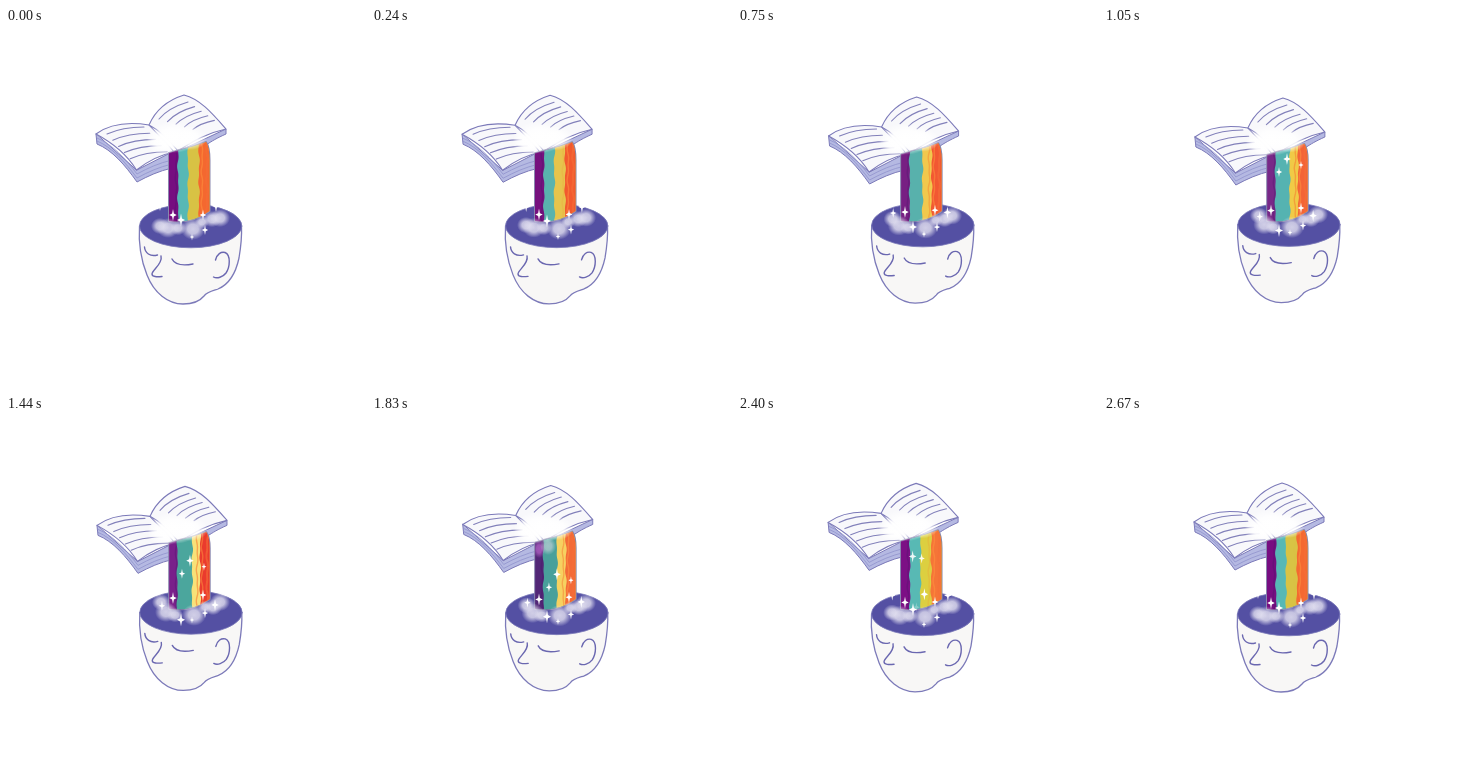
An HTML page with a canvas for the animation above (2700 ms loop, 360 px wide and 360 px high).

```html
<!DOCTYPE html>
<html lang="en">
<head>
<meta charset="utf-8">
<title>Reading mind</title>
<style>
html, body { margin: 0; width: 100%; height: 100%; overflow: hidden; background: #fff; }
canvas { display: block; width: 360px; height: 360px; }
</style>
</head>
<body>
<canvas id="stage" width="360" height="360"></canvas>
<script>
const ctx = document.getElementById('stage').getContext('2d');
const LOOP = 2700, STEP = 30, TAU = Math.PI * 2;
const INK = '#6a67b0', EDGE = '#7c7ab9', RIM = '#5450a3';

const mix = (a, b, k) => a + (b - a) * k;

function shape(d, { fill, stroke, width = 1.3 }) {
  const path = new Path2D(d);
  if (fill) { ctx.fillStyle = fill; ctx.fill(path); }
  if (stroke) { ctx.strokeStyle = stroke; ctx.lineWidth = width; ctx.stroke(path); }
}

function puff(x, y, rx, ry, rgb, alpha, core = 0.45) {
  ctx.save();
  ctx.translate(x, y);
  ctx.scale(rx, ry);
  const g = ctx.createRadialGradient(0, 0, 0, 0, 0, 1);
  g.addColorStop(0, `rgba(${rgb},${alpha})`);
  g.addColorStop(core, `rgba(${rgb},${alpha * 0.9})`);
  g.addColorStop(1, `rgba(${rgb},0)`);
  ctx.fillStyle = g;
  ctx.fillRect(-1, -1, 2, 2);
  ctx.restore();
}

// Four-pointed star, taller than it is wide.
function star(x, y, r, alpha = 1) {
  if (alpha <= 0) return;
  ctx.save();
  ctx.globalAlpha = Math.min(1, alpha);
  ctx.translate(x, y);
  ctx.scale(0.62, 1);
  ctx.beginPath();
  for (let i = 0; i < 8; i++) {
    const a = i * TAU / 8, d = i % 2 ? r * 0.33 : r;
    ctx.lineTo(Math.sin(a) * d, -Math.cos(a) * d);
  }
  ctx.closePath();
  ctx.fillStyle = '#fff';
  ctx.fill();
  ctx.restore();
}

function drawHead(p) {
  ctx.save();
  ctx.translate(0.3 * p, -1.6 * p);
  shape('M133.500 198C132.500 213 135 232 141 247C148 265 162 276 177 276C187 276 194 273 198 268C201 264 206 263 212 261C224 256 230 244 233 230C235 218 236 209 235.500 198Z',
    { fill: '#f8f7f6', stroke: EDGE });
  ctx.beginPath();
  ctx.ellipse(184.7, 198, 51.2, 21.8, 0, 0, TAU);
  ctx.fillStyle = RIM;
  ctx.fill();
  ctx.strokeStyle = EDGE;
  ctx.lineWidth = 0.8;
  ctx.stroke();
  const face = { stroke: INK, width: 1.4 };
  shape('M138.500 219C139 225 144 229 151.500 227', face);
  shape('M155 228C157 236 146 242 146 246C146 249 151 249 156 248.500', face);
  shape('M166 231C169 237 176 238 187 236', face);
  shape('M209.500 232C211 226 215 223.500 219 224.500C225 227 224 239 220 245C217 249 211 251 207.500 249', face);
  ctx.restore();
}

function drawBook(p) {
  ctx.save();
  ctx.translate(p, 3.4 * p);
  const edge = { fill: '#b5b9e2', stroke: EDGE, width: 1 };
  shape('M90 106L91 116C106 122 119 137 131 154C142 148 153 143 166 140L166 124L131 142Z', edge);
  shape('M175 122L220 101L220 106C211 110 206 113 200 117Z', edge);
  const leaf = { stroke: '#9194cd', width: 0.8 };
  shape('M91 110C106 116 119 130 131 146C142 140 153 135 166 132', leaf);
  shape('M91 113C106 119 119 134 131 150C142 144 153 139 166 136', leaf);
  const page = { fill: '#f8f8fb', stroke: EDGE, width: 1.1 };
  shape('M90 106C105 95 124 94 143 97C149 104 158 111 168 124C153 127 142 133 130.500 142C120 125 105 114 90 106Z', page);
  shape('M143 97C150 81 162 72 178 67C194 71 206 85 220 101C201 105 187 113 172 123C163 112 153 102 143 97Z', page);
  const rule = { stroke: '#8280ba', width: 1.1 };
  for (let i = 0; i < 5; i++) {
    const x = 101 + i * 5.8, y = 106 + i * 6.2;
    shape(`M${x} ${y}C${x + 11} ${y - 5} ${x + 22} ${y - 7} ${x + 37} ${y - 7}`, rule);
    const u = 153 + i * 8.5, v = 91 + i * 2.6, span = 29 - i * 1.9, rise = 17 - i * 2;
    shape(`M${u} ${v}C${u + span * 0.25} ${v - rise * 0.5} ${u + span * 0.6} ${v - rise * 0.8} ${u + span} ${v - rise}`, rule);
  }
  ctx.restore();
}

// Each band: left x, drift at mid loop, then colours at the shared moments.
const moments = [0, 450, 1050, 1440, 1830, 2130, 2700];
const bands = [
  [162, 0, ['760d80', '76157d', '782888', '79208a', '522777', '82128a', '760d80']],
  [172, -1, ['57b8b5', '5aaea6', '55b3b1', '4ba69d', '49a09b', '58b9b3', '57b8b5']],
  [182, 4, ['d8c244', 'f2c653', 'f0ca46', 'f8e178', 'f6d160', 'dfda3d', 'd8c244']],
  [193, 1, ['f4682f', 'f04c2d', 'f36436', 'ea3b2d', 'f36a37', 'f5813e', 'f4682f']]
];

function colourAt(list, t) {
  let i = 0;
  while (i < moments.length - 2 && t >= moments[i + 1]) i++;
  const k = (t - moments[i]) / (moments[i + 1] - moments[i]);
  const part = (hex, n) => parseInt(hex.slice(n, n + 2), 16);
  return `rgb(${[0, 2, 4].map(n => Math.round(mix(part(list[i], n), part(list[i + 1], n), k))).join()})`;
}

// Ripple that runs down the bands at the speed of the falling stars.
function ripple(y, t, seed) {
  const turn = t / LOOP * TAU;
  return Math.sin(y / 5 - turn * 3 + seed) * 0.5 + Math.sin(y / 2.5 - turn * 6 + seed * 3) * 0.4;
}

function drawRainbow(t, p) {
  const top = 2 * p;
  const outline = `M163 ${125 + top}C176 ${121 + top} 190 ${118 + top} 200 ${114 + top}Q203.500 ${119 + top} 203.500 132L203.500 183Q186 196 163 193Z`;
  ctx.save();
  ctx.translate(0.2 * p, 0);
  shape(outline, { stroke: '#8987ae', width: 2 });
  ctx.clip(new Path2D(outline));
  bands.forEach(([x, drift, colours], i) => {
    const left = x + drift * p;
    ctx.beginPath();
    for (let y = 108; y <= 200; y++) ctx.lineTo(left + (i ? ripple(y, t, i * 2) : 0), y);
    ctx.lineTo(206, 200);
    ctx.lineTo(206, 108);
    ctx.fillStyle = colourAt(colours, t);
    ctx.fill();
  });
  const streak = (x, rgb, alpha, width) => {
    ctx.strokeStyle = `rgba(${rgb},${alpha})`;
    ctx.lineWidth = width;
    ctx.beginPath();
    for (let y = 112; y < 196; y++) ctx.lineTo(x + ripple(y, t, x), y);
    ctx.stroke();
  };
  const mid = Math.sin(Math.PI * t / LOOP);
  streak(170, '70,20,105', 0.3, 1.5);
  streak(191, '247,126,49', 0.6 * mid, 1.4);
  streak(201, '245,110,55', 0.6, 2);
  streak(196, '255,150,65', 0.5, 1.4);
  const wash = Math.max(0, 1 - Math.abs(t - 1880) / 320);
  puff(167, 133, 6, 9, '198,110,213', wash * 0.8);
  puff(176, 130 + Math.max(0, t - 1830) / 14, 8, 9, '200,212,220', wash * 0.8);
  puff(168, 155, 5, 7, '194,175,216', Math.max(0, 1 - Math.abs(t - 2130) / 250) * 0.6);
  ctx.restore();
}

function drawGlow(p) {
  const y = 3 * p;
  puff(167 + p, 109 + y, 26, 16, '255,255,255', 1, 0.5);
  puff(157 + p, 114 + y, 17, 13, '255,255,255', 0.95);
  puff(184 + p, 110 + y, 17, 12, '255,255,255', 0.95);
}

// Cloud puffs: x, y, size at rest, then x and y at the top of the float.
const puffs = [
  [154, 198, 9, 155, 186], [162, 200, 11, 160, 196], [172, 200, 8, 169, 199],
  [187, 201, 12, 188, 199], [196, 194, 7, 199, 191], [206, 191, 9, 207, 191],
  [214, 190, 10, 214, 186]
];

function drawClouds(p) {
  for (const [x, y, r, x2, y2] of puffs) {
    puff(mix(x, x2, p), mix(y, y2, p), r, r * 0.9, '226,224,240', 0.88);
  }
}

// Drifting stars: start, end, size.
const drifters = [
  [154, 178, 156, 190, 5], [167, 187, 167, 182, 6], [175, 192, 175, 204, 6.5],
  [197, 187, 197, 179, 5.5], [199, 202, 199, 197, 5], [210, 178, 209, 189, 6],
  [186, 209, 186, 204, 3.5]
];

// Falling stars: x, top y, birth, death, size.
const fallers = [
  [183, 131, 1050, 2640, 6], [175, 144, 1050, 2450, 5],
  [197, 137, 1050, 2250, 4], [174, 131, 2130, 2560, 6], [183, 133, 2130, 2560, 5]
];

function drawStars(t, p) {
  for (const [x, y, x2, y2, r] of drifters) star(mix(x, x2, p), mix(y, y2, p), r);
  for (const [x, y, birth, death, r] of fallers) {
    const fade = Math.min((t - birth + 200) / 200, (death - t) / 180);
    star(x + (t - birth) * 0.0025, y + (t - birth) * 0.035, r, fade);
  }
}

function draw(now) {
  const t = Math.floor((now % LOOP) / STEP) * STEP;
  const p = (1 - Math.cos(t / LOOP * TAU)) / 2;
  ctx.fillStyle = '#fff';
  ctx.fillRect(0, 0, 360, 360);
  ctx.lineCap = ctx.lineJoin = 'round';
  drawHead(p);
  drawBook(p);
  drawRainbow(t, p);
  drawGlow(p);
  drawClouds(p);
  drawStars(t, p);
}

const start = performance.now();
function tick() {
  draw(performance.now() - start);
  requestAnimationFrame(tick);
}
tick();
</script>
</body>
</html>
```
